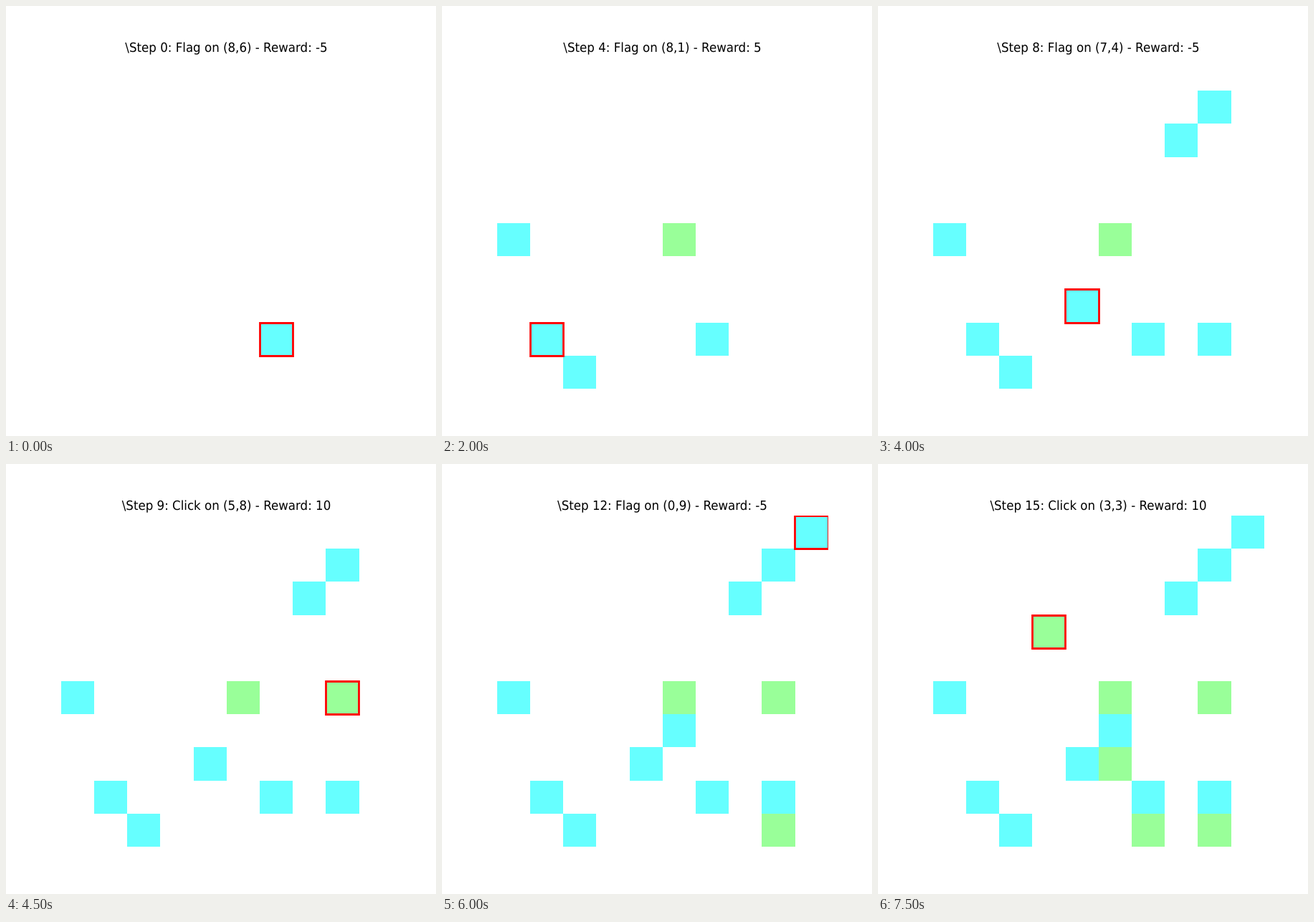
Recreate the animation shown at these times as an HTML page. Size 600 by 600 pixels, loop 8 s.

```html
<!DOCTYPE html>
<html lang="en">
<head>
<meta charset="utf-8">
<title>Grid steps</title>
<style>
  html, body { margin: 0; width: 100%; height: 100%; overflow: hidden; background: #fff; }
  svg { display: block; width: 600px; height: 600px; }
  text { font: 16.667px "DejaVu Sans", sans-serif; text-anchor: middle; text-rendering: geometricPrecision; }
</style>
</head>
<body>
<svg viewBox="0 0 600 600">
  <clipPath id="grid"><rect x="77" y="72" width="462" height="462"/></clipPath>
  <!-- slightly tall letters, like a font hinted to whole pixel rows -->
  <text id="title" transform="translate(307.5 64) scale(1 1.07)"></text>
  <g id="cells" shape-rendering="crispEdges"></g>
  <g clip-path="url(#grid)">
    <path id="cursor" fill="none" stroke="#f00" stroke-width="2.78"/>
  </g>
</svg>
<script>
const STEP_MS = 500, CELL = 46.2;

const KINDS = {
  wrong: { action: 'Flag', reward: -5, color: '#6ff' },
  right: { action: 'Flag', reward: 5, color: '#6ff' },
  safe: { action: 'Click', reward: 10, color: '#9f9' }
};

// the game in order: each run names its kind, then the row and column of each move
const game = `wrong 86, right 50, wrong 92, safe 55, right 81 88,
  wrong 27 18 74, safe 58, wrong 65, safe 98, wrong 09, safe 96 75 33`;

const steps = game.split(',').flatMap(run => {
  const [kind, ...spots] = run.trim().split(' ');
  return spots.map(([r, c]) => ({ r: +r, c: +c, ...KINDS[kind] }));
});

const $ = id => document.getElementById(id);

// pixel-snapped edges of the filled cells and of the outline
const cellX = c => Math.floor(77.3 + c * CELL);
const cellY = r => Math.round(72 + r * CELL);
const lineX = c => Math.floor(77 + c * CELL) + 0.5;
const lineY = r => cellY(r) + 0.5;

function cell({ r, c, color }) {
  const x = cellX(c), y = cellY(r);
  return `<rect x="${x}" y="${y}" width="${cellX(c + 1) - x}" height="${cellY(r + 1) - y}" fill="${color}"/>`;
}

function draw(n) {
  const { r, c, action, reward } = steps[n];
  $('title').textContent = `\\Step ${n}: ${action} on (${r},${c}) - Reward: ${reward}`;
  $('cells').innerHTML = steps.slice(0, n + 1).map(cell).join('');
  $('cursor').setAttribute('d',
    `M${lineX(c)} ${lineY(r)}H${lineX(c + 1)}V${lineY(r + 1)}H${lineX(c)}Z`);
}

const start = performance.now();
let shown = -1;

function tick() {
  const n = Math.floor((performance.now() - start) / STEP_MS) % steps.length;
  if (n !== shown) draw(shown = n);
  requestAnimationFrame(tick);
}
tick();
</script>
</body>
</html>
```
